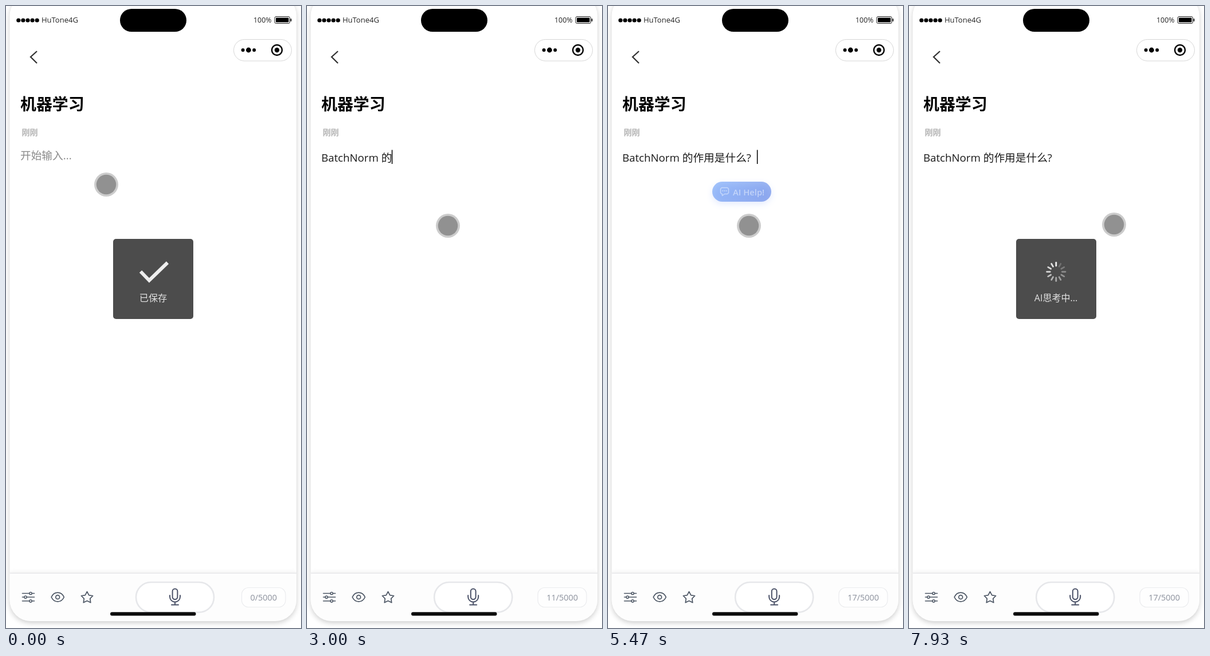
Recreate the animation shown at these times as an HTML page with a canvas. Size 515 by 1087 pixels, loop 8 s.

```html
<!DOCTYPE html>
<html lang="zh-CN">
<head>
<meta charset="utf-8">
<title>Note editor</title>
<style>
html, body { margin: 0; width: 100%; height: 100%; overflow: hidden; background: #fff; }
canvas { display: block; width: 515px; height: 1087px; }
</style>
</head>
<body>
<canvas id="stage"></canvas>
<script>
const W = 515, H = 1087, LOOP = 8000, TICK = 1000 / 15;
const FONT = "'Open Sans', 'Noto Sans CJK SC', 'Noto Sans CJK', sans-serif";
const canvas = document.getElementById('stage');
const c = canvas.getContext('2d');
const dpr = window.devicePixelRatio || 1;
canvas.width = W * dpr;
canvas.height = H * dpr;

const LEFT = 25, BODY = 18.7, BASE = 271.5;
const zuo = '做 作 坐 左 昨 座 佐';
const zuoyong = '作用 做 作 坐 左 昨 座';
const shi = '作用是 作用 做 作 坐 左';

// Typing steps: time, committed text, text being composed, candidate words
const steps = [
  [0, '', ''],
  [600, '', ''],
  [930, '', 'B', 'But By Be Back Before'],
  [1000, '', 'Ba', 'Back Bad Bank Based Ball'],
  [1130, '', 'Bat', 'Batch Bath Bathroom Battery Battle'],
  [1530, '', 'Batc', 'Batch Batches Batched Batching Bath'],
  [1600, '', 'Batch', 'Batch Batches Batched Batching Bath'],
  [1870, '', 'BatchN', 'BatchN Batch_No Batch_Name Batch'],
  [2000, '', 'BatchNo', 'BatchNo Batch_No Batch_Not Batch'],
  [2200, '', 'BatchNor', 'BatchNor Batch_Nor Batch_North'],
  [2400, '', 'BatchNorm', 'BatchNorm Batch_Norm Batch'],
  [2600, 'BatchNorm', ''],
  [2800, 'BatchNorm ', ''],
  [2930, 'BatchNorm ', 'd', '的 到 都 大 对 多 地'],
  [3000, 'BatchNorm 的', ''],
  [3470, 'BatchNorm 的', 'z', '在 这 中 最 做 再 着'],
  [3530, 'BatchNorm 的', 'zu', '组 足 租 族 祖 阻 卒'],
  [3600, 'BatchNorm 的', 'zuo', zuo],
  [3670, 'BatchNorm 的', "zuo'y", zuoyong],
  [3800, 'BatchNorm 的', "zuo'yo", '左右 做 作 坐 左 昨 座'],
  [3870, 'BatchNorm 的', "zuo'yon", zuoyong],
  [3930, 'BatchNorm 的', "zuo'yong", zuoyong],
  [4070, 'BatchNorm 的', "zuo'yong'sh", shi],
  [4130, 'BatchNorm 的', "zuo'yong'shi", shi],
  [4200, 'BatchNorm 的', "zuo'yong'shi's", '作用是啥 作用是 作用 做 作'],
  [4270, 'BatchNorm 的', "zuo'yong'shi'she", '作用是什么 作用是 作用 做'],
  [4330, 'BatchNorm 的', "zuo'yong'shi'shen", '作用是什么 作用是 作用 做'],
  [4470, 'BatchNorm 的', "zuo'yong'shi'shen'me", '作用是什么 作用是 作用 做'],
  [4530, 'BatchNorm 的作用是什么', ''],
  [5330, 'BatchNorm 的作用是什么?', '']
];

// Pointer legs: start, end, from x, from y, to x, to y
const legs = [
  [0, 470, 175, 312, 246, 384],
  [6290, 6600, 246, 384, 252, 342],
  [7180, 7930, 252, 342, 358, 382]
];

const clamp = v => Math.max(0, Math.min(1, v));
const ramp = (t, a, b) => clamp((t - a) / (b - a));
const smooth = p => p * p * (3 - 2 * p);

function box(x, y, w, h, r, fill, stroke, lw = 1) {
  c.beginPath();
  c.roundRect(x, y, w, h, r);
  if (fill) { c.fillStyle = fill; c.fill(); }
  if (stroke) { c.strokeStyle = stroke; c.lineWidth = lw; c.stroke(); }
}

function disc(x, y, r, fill, stroke, lw) {
  c.beginPath();
  c.arc(x, y, r, 0, Math.PI * 2);
  if (fill) { c.fillStyle = fill; c.fill(); }
  if (stroke) { c.strokeStyle = stroke; c.lineWidth = lw; c.stroke(); }
}

function path(points, color, lw, cap = 'round', join = 'round') {
  c.beginPath();
  points.forEach(([x, y]) => c.lineTo(x, y));
  c.strokeStyle = color;
  c.lineWidth = lw;
  c.lineCap = cap;
  c.lineJoin = join;
  c.stroke();
}

function text(s, x, y, size, color, weight = 400, align = 'left') {
  c.font = `${weight} ${size}px ${FONT}`;
  c.fillStyle = color;
  c.textAlign = align;
  c.fillText(s, x, y);
}

function width(s, size) {
  c.font = `400 ${size}px ${FONT}`;
  return c.measureText(s).width;
}

function shadow(color, blur, dy) {
  c.shadowColor = color;
  c.shadowBlur = blur * dpr;
  c.shadowOffsetY = dy * dpr;
}
const noShadow = () => shadow('transparent', 0, 0);

function drawPhone() {
  c.fillStyle = '#fff';
  c.fillRect(0, 0, W, H);
  shadow('rgba(0,0,0,.2)', 10, 3);
  box(6.5, -20, 500.5, 1095, 37, '#fff');
  noShadow();

  for (let i = 0; i < 5; i++) disc(21.8 + i * 8.1, 25, 3.6, '#000');
  text('HuTone4G', 62, 29, 13, '#222');
  box(199, 5, 116, 40, 20, '#000');
  text('100%', 432, 29.3, 12.4, '#222');
  box(469, 18.5, 26.5, 12, 2.5, null, '#222', 1);
  box(471, 20.5, 22.5, 8, 1, '#000');
  box(496.5, 22, 2, 5, 1, '#222');

  path([[54, 79], [43, 89], [54, 100]], '#333', 2.3, 'butt', 'miter');
  box(397.5, 58.5, 101, 37.5, 18.7, '#fff', '#d6d6d6');
  disc(413.6, 77, 3, '#000');
  disc(423.4, 77, 4.4, '#000');
  disc(433.2, 77, 3, '#000');
  disc(473, 77, 9, null, '#000', 2.4);
  disc(473, 77, 4.2, '#000');

  text('机器学习', LEFT, 181.5, 27.9, '#000', 700);
  text('刚刚', 27.5, 226, 14, '#b4b4b4', 600);
}

function drawMic(x) {
  const ink = '#4b5268';
  box(x - 68, 1007, 136, 52.5, 26, '#fff', '#e6e7ea', 2.6);
  box(x - 4.4, 1018.5, 8.8, 18.5, 4.4, null, ink, 2);
  c.beginPath();
  c.moveTo(x - 9, 1030);
  c.lineTo(x - 9, 1032.5);
  c.arc(x, 1032.5, 9, Math.PI, 0, true);
  c.lineTo(x + 9, 1030);
  c.lineCap = 'round';
  c.stroke();
  path([[x, 1042], [x, 1046]], ink, 2);
  path([[x - 6, 1046.5], [x + 6, 1046.5]], ink, 2);
}

function drawBar(count) {
  const ink = '#4b5563', wide = count > 9;
  c.save();
  c.beginPath();
  c.roundRect(6.5, -20, 500.5, 1095, 37);
  c.clip();
  shadow('rgba(0,0,0,.06)', 8, -2);
  c.fillStyle = '#fdfdfd';
  c.fillRect(6, 991, 502, 90);
  noShadow();
  c.fillStyle = '#e7e8ea';
  c.fillRect(6, 990.5, 502, 1.5);
  c.restore();

  [[1026.5, 43], [1033, 34], [1039.8, 43]].forEach(([y, knob]) => {
    path([[28.5, y], [49.5, y]], ink, 1.6);
    disc(knob, y, 2.1, '#fdfdfd', ink, 1.5);
  });

  c.beginPath();
  c.moveTo(79.2, 1033);
  c.bezierCurveTo(84, 1022.5, 96.5, 1022.5, 101.3, 1033);
  c.bezierCurveTo(96.5, 1043.5, 84, 1043.5, 79.2, 1033);
  c.strokeStyle = ink;
  c.lineWidth = 1.7;
  c.stroke();
  disc(90.2, 1033, 3.4, null, ink, 1.7);

  const star = [];
  for (let i = 0; i <= 10; i++) {
    const a = -Math.PI / 2 + i * Math.PI / 5, r = i % 2 ? 5.5 : 10.6;
    star.push([141.5 + r * Math.cos(a), 1034 + r * Math.sin(a)]);
  }
  path(star, ink, 1.7);

  drawMic(wide ? 290.2 : 295);
  const x = wide ? 403 : 411.5;
  box(x, 1016.5, 488 - x, 34, 12, '#fefefe', '#ebecee', 1.2);
  text(count + '/5000', 473, 1039, 14.4, '#8b909c', 500, 'right');
  box(182, 1059.3, 149.5, 6.2, 3, '#0c0c0c');
}

function drawPopup(x, words) {
  let pos = x + 21;
  const items = words.split(' ').map(word => {
    const s = word.replace('_', ' ');
    const item = { s, x: pos, end: pos + 16 + width(s, 18.5) };
    pos = item.end + 31;
    return item;
  });
  const end = items[items.length - 1].end + 17;
  shadow('rgba(0,0,0,.2)', 10, 5);
  box(x, 279, end - x, 46, 8, '#f9f9f9');
  noShadow();
  box(x, 279, end - x, 46, 8, null, '#dedede', 1);
  box(x + 5, 285, items[0].end + 12 - x - 5, 34, 5, '#f0f0f0');
  box(x + 5.5, 292, 4.5, 21, 2.2, '#0560b8');
  items.forEach((item, i) => {
    text(i + 1, item.x, 309, 18.5, '#666');
    text(item.s, item.x + 16, 309, 18.5, '#111');
  });
}

function drawBody(t) {
  const [since, done, typing, words] = steps.filter(s => s[0] <= t + 6).pop();
  if (!done && !typing) text('开始输入...', LEFT, 268, BODY, '#8a8a8a');
  text(done + typing, LEFT, BASE, BODY, '#1a1a1a');
  const start = LEFT + width(done, BODY);
  let end = start + width(typing, BODY);
  if (done.endsWith('?')) end = LEFT + width(done.slice(0, -1), BODY) + BODY;
  if (typing) {
    c.fillStyle = '#777';
    for (let x = start; x < end; x += 2) c.fillRect(x, 274.5, 1.1, 1.2);
    drawPopup(start, words);
  }
  const focused = t > 590 && t < 6925;
  const lit = Math.floor((t + 6 - since) / 535) % 2 === 0;
  if (focused && lit) {
    c.fillStyle = '#000';
    c.fillRect(end - 0.6, 251.5, 1.5, 24.5);
  }
  return done.length;
}

function drawHelp(t) {
  if (t < 5325 || t > 6925) return;
  const p = ramp(t, 5330, 5870);
  c.save();
  c.globalAlpha = 1 - Math.pow(1 - p, 2.1);
  c.translate(233.5, 324.5);
  const s = 1 - 0.02 * ramp(t, 6580, 6660);
  c.scale(s, s);
  const g = c.createLinearGradient(-34, -34, 34, 34);
  g.addColorStop(0, '#3b82f6');
  g.addColorStop(1, '#2051d9');
  shadow('rgba(59,110,246,.3)', 12, 4);
  box(-51.5, -17.5, 103, 35, 17.5, g);
  noShadow();
  path([[-35, -7], [-25, -7], [-23, -5], [-23, 2], [-25, 4], [-30, 4],
    [-34, 7], [-34, 4], [-35, 4], [-37, 2], [-37, -5], [-35, -7]], '#fff', 1.5);
  for (let i = -1; i < 2; i++) disc(-30 + i * 3.2, -1.5, 1.1, '#fff');
  text('AI Help!', -15.5, 6, 14.8, '#fff', 600);
  c.restore();
}

function drawToast(t) {
  const saved = t < 860, thinking = t > 6990;
  if (!saved && !thinking) return;
  c.save();
  c.globalAlpha = saved ? 1 - ramp(t, 750, 850) : ramp(t, 6940, 7060);
  box(187, 407, 140, 140, 5, '#4c4c4c');
  if (saved) {
    path([[235, 464], [250, 479.5], [282, 448.5]], '#eee', 6, 'butt', 'miter');
    text('已保存', 257, 516, 16.2, '#e2e2e2', 400, 'center');
  } else {
    const head = Math.floor((t - 7925) / (1000 / 12));
    for (let i = 0; i < 12; i++) {
      const a = (head + i + 1) * Math.PI / 6;
      const dx = Math.sin(a), dy = -Math.cos(a);
      const v = Math.round(112 + i * 11.5);
      path([[256.8 + dx * 10.5, 464.5 + dy * 10.5], [256.8 + dx * 16.2, 464.5 + dy * 16.2]],
        `rgb(${v},${v},${v})`, 2.8);
    }
    text('AI思考中...', 256.5, 515.5, 16, '#e2e2e2', 400, 'center');
  }
  c.restore();
}

function drawPointer(t) {
  const [a, b, x0, y0, x1, y1] = legs.filter((leg, i) => !i || leg[0] <= t).pop();
  const p = smooth(ramp(t, a, b));
  const x = x0 + (x1 - x0) * p, y = y0 + (y1 - y0) * p;
  disc(x, y, 21, 'rgba(0,0,0,.2)');
  disc(x, y, 17.3, 'rgba(0,0,0,.29)');
}

function draw(now) {
  // The screen refreshes fifteen times a second
  const t = Math.floor((now % LOOP) / TICK + 0.06) * TICK % LOOP;
  c.setTransform(dpr, 0, 0, dpr, 0, 0);
  drawPhone();
  const count = drawBody(t);
  drawBar(count);
  drawHelp(t);
  drawToast(t);
  drawPointer(t);
}

let begin = null;
function loop(now) {
  if (begin === null) begin = now;
  draw(now - begin);
  requestAnimationFrame(loop);
}
draw(0);
requestAnimationFrame(loop);
</script>
</body>
</html>
```
